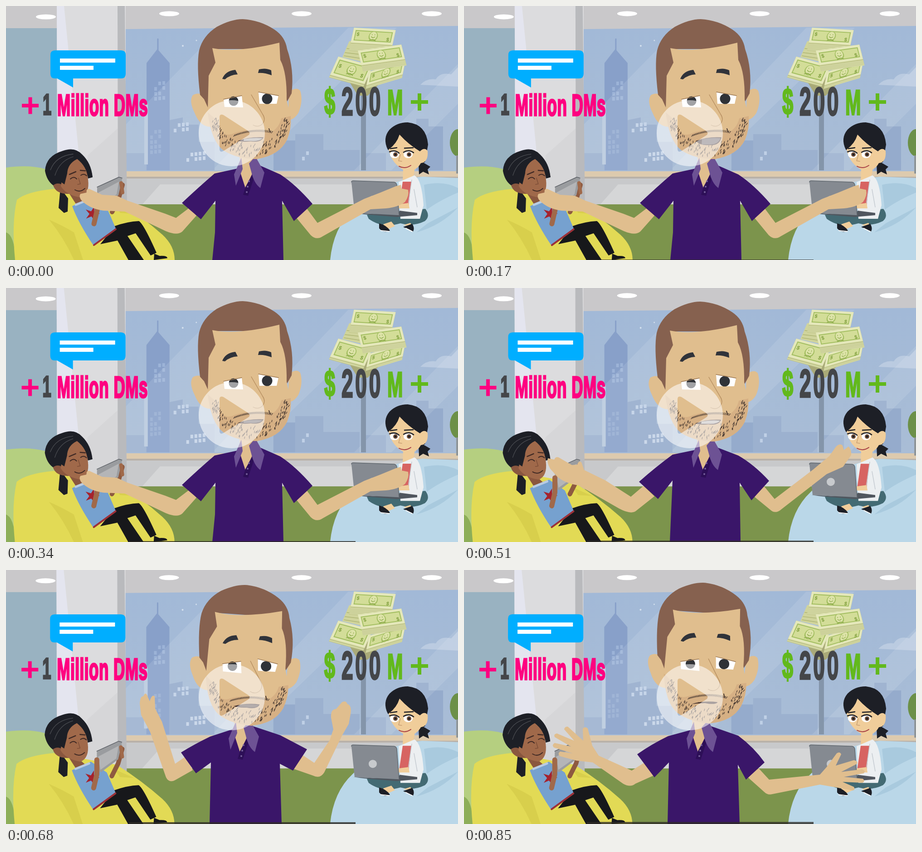
An HTML page with a canvas for the animation above (930 ms loop, 997 by 561 pixels).

```html
<!DOCTYPE html>
<html lang="en">
<head>
<meta charset="utf-8">
<title>Explainer scene</title>
<style>
html, body { margin: 0; width: 100%; height: 100%; overflow: hidden; background: #c9c8ca; }
canvas { display: block; }
</style>
</head>
<body>
<canvas id="stage" width="997" height="561"></canvas>
<script>
const ctx = document.getElementById('stage').getContext('2d');
const STEP = 170, LOOP = 930, TAU = Math.PI * 2;
const SKIN = '#e0be8e', DARK = '#30333a', PINK = '#ff0080', GREEN = '#62b91c', BLACK = '#1d1f26';

function fill(color, d, rule = 'nonzero') {
  ctx.fillStyle = color;
  ctx.fill(new Path2D(d), rule);
}
function line(color, width, d) {
  ctx.strokeStyle = color;
  ctx.lineWidth = width;
  ctx.lineCap = ctx.lineJoin = 'round';
  ctx.stroke(new Path2D(d));
}
function rect(color, x, y, w, h) {
  ctx.fillStyle = color;
  ctx.fillRect(x, y, w, h);
}
function oval(color, x, y, rx, ry = rx) {
  ctx.fillStyle = color;
  ctx.beginPath();
  ctx.ellipse(x, y, rx, ry, 0, 0, TAU);
  ctx.fill();
}
function seeded(s) {
  return () => (s = (s * 16807) % 2147483647) / 2147483647;
}

function windows(x, y, cols, rows, color) {
  for (let r = 0; r < rows; r++)
    for (let c = 0; c < cols; c++)
      if ((r * 2 + c * 3) % 5) rect(color, x + c * 9, y + r * 11 - c, 6, 8);
}

function room() {
  rect('#c9c8ca', 0, 0, 997, 561);
  rect('#99b2c1', 0, 49, 114, 320);

  const sky = ctx.createLinearGradient(0, 45, 0, 365);
  sky.addColorStop(0, '#a2b9d7');
  sky.addColorStop(1, '#a9bdd6');
  fill(sky, 'M264 51L997 44V365H264Z');
  fill('#95abcc', 'M361 252L390 246V262H425V300H460V363H361ZM590 297H638V363H590ZM905 249H932V266H964V363H905Z');
  fill('#9cb1cf', 'M264 325H310V363H264ZM638 283H700V318H780V363H638ZM794 325H838V363H794Z');
  fill('#88a0c9', 'M310 126L334 95L361 126V363H310Z');
  line('#88a0c9', 3, 'M335 73V100');
  rect('#b9cade', 305, 215, 8, 135);
  windows(327, 168, 3, 4, '#9cb3d7');
  windows(318, 275, 3, 5, '#95acd1');
  windows(370, 260, 4, 2, '#bfd0e6');
  windows(398, 325, 5, 2, '#c5d4e7');
  windows(653, 322, 2, 2, '#bfd0e6');
  fill('rgba(255,255,255,.24)', 'M914 174Q928 159 948 162Q958 145 982 151L997 135V178Z');
  fill('rgba(255,255,255,.1)', 'M430 92L460 65V363H264V262ZM755 48H862L535 363H455ZM997 128V216L850 363H768Z');
  oval('#d4e0ee', 390, 88, 2);
  oval('#d4e0ee', 420, 76, 1.5);
  rect('#8495aa', 783, 180, 11, 183);

  rect('#ddcaae', 264, 365, 733, 12);
  rect('#b9b1a8', 264, 377, 733, 4);
  rect('#c8c9cb', 264, 381, 733, 58);
  fill('#d5d6d7', 'M340 394H997V439H300Z');
  rect('#7c944c', 264, 438, 733, 123);

  fill('#dcdcde', 'M112 0H264V450H113Z');
  fill('#e4e5ef', 'M112 0L128 0L168 400H114Z');
  fill('#d6d6d8', 'M180 330L247 270V450H175Z');
  fill('#b9babd', 'M246 0H262L267 450H247Z');
  for (const [x, y] of [[88, 24], [360, 17], [652, 17], [939, 17]]) oval('#fff', x, y, 22, 5.5);

  oval('#6c9048', 997, 302, 18, 30);
  rect('#8e9598', 993, 330, 4, 40);
}

function beanbags() {
  fill('#b5cf80', 'M0 357Q50 350 86 360L130 420L30 561H0Z');
  fill('#8dae58', 'M0 500Q18 505 22 561H0Z');
  fill('#e2da55', 'M20 561Q12 480 24 428Q45 410 105 404L245 430Q300 465 345 505Q372 530 372 561Z');
  fill('#d8cf4c', 'M95 472Q125 485 150 500L170 561H150Q128 512 95 472ZM240 440L283 459L252 457Z');
  fill('#bad7e8', 'M715 561Q722 490 765 450Q830 385 918 377L997 380V561Z');
  fill('#a9cade', 'M922 395Q965 385 997 402V412Q955 430 928 450ZM930 480L997 445Q960 485 905 500Z');
}

function reader() {
  fill(BLACK, 'M86 364Q88 331 125 320Q152 310 168 328Q188 347 191 378L184 380L158 345L132 372L126 398L104 396Q90 386 86 364ZM120 402L137 425L136 454L128 457L116 446Z');
  fill('#8a573f', 'M104 396Q114 388 126 396L158 414L176 430L156 440L140 415Q110 416 104 396Z');
  fill('#a0694a', 'M123 385Q129 347 154 335Q178 346 181 383Q185 415 165 423Q133 418 121 398Z');
  fill(BLACK, 'M120 388Q122 334 154 327Q184 340 191 378L181 381Q178 354 157 338Q136 348 135 370L129 394Z');
  line('#4b4d52', 1.3, 'M98 362Q110 331 148 327M108 374Q118 342 148 333');
  line('#402a25', 2, 'M142 382Q150 375 156 382M165 374Q172 369 178 375M152 406Q163 413 174 403');
  line('#402a25', 2.5, 'M140 372L154 366M164 363L175 364');
  line('#7d4e38', 1.5, 'M160 380L164 393L158 394');
  fill('#17181b', 'M208 526L240 486Q268 476 293 475Q303 480 332 545L319 551L286 502L268 508L304 561H270L246 518ZM327 547L339 552Q356 551 356 557L326 561Z');
  fill('#76a1cf', 'M146 442L188 423L223 447L242 491L193 529Q160 480 146 442Z');
  line('#9c3038', 4, 'M194 528L242 493');
  line('#b9cbe2', 5, 'M154 439L184 427');
  let star = '';
  for (let i = 0; i < 10; i++) {
    const a = i * Math.PI / 5 - 1.3, r = i % 2 ? 6 : 17;
    star += (i ? 'L' : 'M') + (190 + Math.cos(a) * r) + ' ' + (459 + Math.sin(a) * r);
  }
  fill('#a5222d', star + 'Z');
  line('#8e5a40', 10, 'M234 455L248 427L257 395');
  fill('#9a9c9f', 'M201 401L249 378Q257 377 256 384L248 418L211 446Q203 445 201 438Z');
  fill('#b4b5b7', 'M204 412L249 388L244 416L209 441Z');
  line('#5d6167', 1.5, 'M201 400L249 378L256 380');
  line('#a0694a', 11, 'M194 481L201 451L201 419');
  line('#a0694a', 8, 'M254 391L257 412');
}

function typist() {
  fill('#436a73', 'M796 461L925 448Q937 464 924 475Q898 488 870 480Q830 492 800 470Z');
  fill('#f0cd9a', 'M832 482L850 476L858 486L840 494ZM876 484L892 479L897 487Z');
  fill(BLACK, 'M823 480Q839 484 847 496Q833 503 823 491ZM876 488L896 481Q902 490 898 498Z');
  line('#fff', 2, 'M827 496L845 498M882 491L896 498');
  fill('#f0cd9a', 'M876 358H902L896 390H875Z');
  fill('#eceff1', 'M866 389L901 374Q917 383 921 440L913 470H870Z');
  fill('#d76462', 'M875 388H894L888 442H867Z');
  line('#c5cbd1', 1.5, 'M895 384L886 446M900 405L907 444');
  fill('#f0cd9a', 'M865 438L888 435L890 447H865Z');

  fill(BLACK, 'M842 317Q830 292 846 273Q862 257 886 257Q927 261 931 306L924 345L905 350L850 322ZM910 347L919 345L936 355L930 361L933 372L920 366L911 372Z');
  fill('#f0cd9a', 'M844 317Q862 304 868 284Q888 306 913 321Q923 311 930 320Q932 345 915 347Q905 366 881 364Q851 350 844 317Z');
  for (const x of [857, 887]) {
    oval('#fff', x, 328, 10, 8);
    oval('#76533c', x + 2, 328, 5);
    oval(BLACK, x + 2, 328, 2.5);
  }
  line(BLACK, 2.5, 'M846 322Q858 317 867 325M877 323Q889 316 899 324M848 315L862 313M879 314L898 313');
  line('#c99f74', 1.5, 'M870 328L866 342L873 343');
  line('#a94448', 2, 'M867 354Q880 361 893 352');

  fill('#50565e', 'M766 457L866 462L868 452L907 457V462L862 466L790 460Z');
  fill('#858a91', 'M762 389Q762 386 766 386L856 389Q861 390 862 395L867 462L769 457Z');
  line('#626970', 1.5, 'M762 389Q762 386 766 386L856 389Q861 390 862 395L867 462');
  oval('#c7cacd', 809, 428, 9);
}

function bill(x, y, turn, skew, w, h, depth) {
  ctx.save();
  ctx.translate(x, y);
  ctx.transform(1, turn, skew, 1, 0, 0);
  rect('#c2c78c', -w / 2, -h / 2, w, h + depth);
  for (let i = 3; i < depth; i += 3) rect('#dce0b0', -w / 2, h / 2 + i, w, 1.4);
  rect('#e5e8bb', -w / 2, -h / 2, w, h);
  rect('#a4bf62', -w / 2 + 5, -h / 2 + 5, w - 10, h - 10);
  rect('#d3dd98', -w / 2 + 7, -h / 2 + 7, w - 14, h - 14);
  oval('#a4bf62', 0, 0, 10, 11);
  oval('#dde3a8', 0, -1, 8, 9);
  line('#8aa747', 1.3, 'M-3 -4V-3M3 -4V-3M-4 1Q0 5 4 1M-7 10Q0 4 7 10');
  ctx.fillStyle = '#7e9e3c';
  ctx.font = 'bold 11px "Liberation Sans", sans-serif';
  ctx.fillText('$', -w / 2 + 9, 1);
  ctx.fillText('$', w / 2 - 16, 9);
  ctx.restore();
}

function money() {
  fill('#a9aa78', 'M750 155L835 160L798 198H776Z');
  fill('#d0d49c', 'M757 78L800 70L815 130L742 113Z');
  line('#aeb573', 1.5, 'M752 94L790 98M748 103L790 108M746 110L790 117');
  bill(810, 67, .06, -.22, 92, 33, 18);
  bill(762, 142, .27, -.45, 76, 40, 6);
  bill(838, 148, -.3, -.2, 80, 30, 8);
  bill(828, 108, -.14, .25, 96, 32, 14);
}

// One shared condensed look for every caption.
function caption(str, x, y, size, color, spacing = 0) {
  ctx.save();
  ctx.translate(x, y);
  ctx.scale(.53, 1);
  ctx.font = `bold ${size}px "Liberation Sans", Arial, sans-serif`;
  ctx.letterSpacing = spacing + 'px';
  ctx.fillStyle = ctx.strokeStyle = color;
  ctx.lineWidth = 3.5;
  ctx.lineJoin = 'miter';
  ctx.miterLimit = 3;
  ctx.fillText(str, 0, 0);
  ctx.strokeText(str, 0, 0);
  ctx.restore();
}
function plus(color, x, y, size) {
  rect(color, x - size / 2, y - 4, size, 8);
  rect(color, x - 4, y - size / 2, 8, size);
}

function captions() {
  fill('#00aeff', 'M108 98H254Q264 98 264 108V150Q264 160 254 160H148V180L113 160H108Q98 160 98 150V108Q98 98 108 98Z');
  rect('#fff', 119, 116, 122, 9);
  rect('#fff', 119, 132, 74, 9);
  plus(PINK, 53.5, 220, 37);
  caption('1', 81, 240, 65, '#444649');
  caption('Million DMs', 113, 242, 66, PINK, 1);
  caption('$', 702, 239, 82, GREEN);
  caption('200', 740, 241, 87, '#444649', 9);
  caption('M', 841, 240, 78, GREEN);
  plus(GREEN, 912, 212, 38);
}

const offering = {
  shirt: 'M515 358L460 370Q425 400 388 435L430 471L462 430L461 500L455 561H612L609 430L635 475L676 437Q640 395 605 372L555 350Z',
  left: 'M404 446L375 468L352 459L268 430L244 419L212 417L184 404Q176 403 178 412L164 415Q160 422 167 430Q185 448 215 452L262 454L352 497Q378 508 389 498L420 463Z',
  right: 'M664 448L687 479L790 426L826 412L860 398L871 395L872 403L887 406Q890 419 880 433Q866 444 838 447L804 449L698 509Q684 518 672 506L640 467Z',
  shift: 0, head: [0, 0, 0]
};
const reaching = {
  shirt: 'M513 357L460 368Q422 396 386 428L428 466L460 425L454 561H610L608 430L634 469L673 426Q640 390 605 370L553 350Z',
  left: 'M396 437L368 461L312 425L265 402L259 385Q253 380 250 390L238 391L212 376Q203 370 199 379L185 376Q182 384 190 399L206 417Q224 432 253 436L342 487Q370 502 381 491L420 460Z',
  right: 'M662 438L685 466L770 401L806 371L820 351Q829 342 835 348L838 358L848 350Q855 356 854 369L836 395L800 411L701 488Q688 500 677 491L638 459Z',
  shift: -1, head: [0, -1, 1]
};
const raised = {
  shirt: 'M505 350L450 368Q415 385 386 403L419 449L452 425L449 561H608L604 428L633 443L664 396L605 365L545 345Z',
  left: 'M396 412L373 428L344 335L329 306L328 279Q322 273 317 290L311 276Q307 269 303 279Q296 278 295 295L298 320L318 358L353 458Q360 472 375 463L412 442Z',
  right: 'M653 408L680 426L714 376L722 352L717 326Q716 307 728 307L741 292Q750 287 753 296Q763 299 760 318L756 340L741 366L702 447Q693 462 677 454L634 439Z',
  shift: -12, head: [.07, -2, 5]
};
const open = {
  shirt: 'M505 352L450 367Q413 385 382 407L420 458L452 425L449 561H608L604 430L622 463L663 425Q640 392 605 366L545 345Z',
  left: 'M397 426L370 443L297 410L283 388L273 350Q267 344 262 351L263 377L229 346Q222 345 221 352L243 377L205 361Q197 362 200 369L236 390L200 382Q193 386 198 392L240 405L212 401Q206 405 211 411L248 421L284 425L351 472Q367 481 378 472L418 454Z',
  right: 'M650 438L673 463L785 452L800 435L822 405Q829 400 832 407L820 432L860 420Q869 421 867 428L832 446L878 440Q887 443 882 449L838 457L880 461Q886 467 879 470L835 468L860 479Q864 486 857 487L820 480L785 474L680 495Q670 498 662 490L624 456Z',
  shift: -12, head: [.07, -2, 0]
};
const poses = [offering, offering, offering, reaching, raised, open];
// Lip drop and tooth colour for each step.
const lips = [[8, '#aaa4a3'], [16, '#6d6569'], [8, '#6f676a'], [9, '#b9b4b3'], [8, '#5a4a48'], [3, '#4a3832']];

function beard() {
  fill('#d6b084', 'M445 235L468 255Q475 290 498 283Q535 267 585 279Q603 268 607 248L628 243Q630 270 620 295Q603 330 553 338Q510 338 480 319Q452 298 445 235Z');
  const rnd = seeded(71);
  ctx.strokeStyle = '#463831';
  ctx.lineWidth = 1.2;
  ctx.beginPath();
  for (let i = 0; i < 170; i++) {
    const a = rnd() * Math.PI, k = rnd();
    const x = 538 + Math.cos(a) * (71 + k * 15), y = 251 + Math.sin(a) * (56 + k * 27);
    ctx.moveTo(x, y);
    ctx.lineTo(x + rnd() * 3, y - 4);
  }
  for (let x = 502; x < 586; x += 3.2) {
    const y = 278 + (x - 545) ** 2 / 280 - (x - 545) * .08;
    ctx.moveTo(x, y);
    ctx.lineTo(x + 3, y - 4);
  }
  ctx.stroke();
}

function head([turn, dx, dy], [drop, teeth]) {
  ctx.save();
  ctx.translate(538 + dx, 200 + dy);
  ctx.rotate(turn);
  ctx.translate(-538, -200);
  fill(SKIN, 'M449 202Q425 188 412 197Q403 210 416 236Q428 267 452 267ZM624 190Q640 177 649 187Q656 210 645 236Q635 252 622 252Z');
  fill('#86614f', 'M428 196Q420 130 426 98Q434 66 465 46Q497 29 522 29Q560 31 592 52Q616 68 620 95Q636 140 630 193L620 211L600 150V95H460L470 150L447 228L437 206Z');
  fill(SKIN, 'M455 93Q510 104 603 81L605 119Q620 147 619 207L628 247Q630 270 620 295Q603 330 553 338Q510 338 480 319Q452 298 445 230L447 154L462 125Z');
  beard();
  line('#b58d5f', 1.4, 'M541 196L566 239Q574 251 565 261Q556 269 545 263');
  line('#4c3b34', 2, 'M580 271L583 279');
  fill('#fff', 'M480 206L520 198L523 224L482 223ZM557 190L601 198L597 216L559 216Z');
  oval('#2f3237', 502, 210, 10.5);
  oval('#2f3237', 576, 205, 11.5);
  line('#9c7852', 1.5, 'M480 206L520 198M557 190L601 198');
  fill(DARK, 'M477 161Q484 143 506 141L511 151Q494 152 483 162ZM556 148L558 140Q573 136 585 142L586 153Q570 147 556 148Z');
  const base = 291 + drop;
  fill('#3d2b2a', `M511 298Q538 288 568 290Q563 ${base + 3} 540 ${base}Q522 ${base + 2} 511 298Z`);
  fill(teeth, `M525 294Q545 290 566 292Q560 ${base} 541 ${base - 1}L524 ${base - 1}Z`);
  ctx.restore();
}

function presenter(i) {
  const pose = poses[i];
  fill(SKIN, pose.left);
  fill(SKIN, pose.right);
  fill('#3a1669', pose.shirt);
  ctx.save();
  ctx.translate(pose.shift, 0);
  fill(SKIN, 'M515 325H557L552 352L528 402L517 368Z');
  fill('#2d0f57', 'M528 400L551 358L548 376L534 419L523 417Z');
  fill('#6d5294', 'M519 335L503 372L507 397L522 360ZM550 332L570 368L561 402Q547 392 541 366L536 348Z');
  for (const [x, y] of [[536, 387], [533, 399], [531, 411]]) oval('#75609b', x, y, 2);
  ctx.restore();
  head(pose.head, lips[i]);
}

function playButton() {
  fill('rgba(255,255,255,.55)', 'M425 281A73 73 0 1 1 571 281A73 73 0 1 1 425 281ZM471 246V315Q471 325 480 320L534 286Q541 281 534 276L480 241Q471 237 471 246Z', 'evenodd');
}

function draw(i) {
  ctx.setTransform(1, 0, 0, 1, 0, 0);
  const zoom = 1 + i * .00025;
  ctx.translate(850, 200);
  ctx.scale(zoom, zoom);
  ctx.translate(-850, -200);
  room();
  beanbags();
  reader();
  typist();
  money();
  captions();
  ctx.setTransform(1, 0, 0, 1, 0, 0);
  presenter(i);
  playButton();
  const bar = Math.min(i, 4.5);
  rect('rgba(45,43,38,.8)', 271, 561 - bar, 500, bar);
}

function tick() {
  draw(Math.floor(performance.now() % LOOP / STEP));
  requestAnimationFrame(tick);
}
tick();
</script>
</body>
</html>
```
